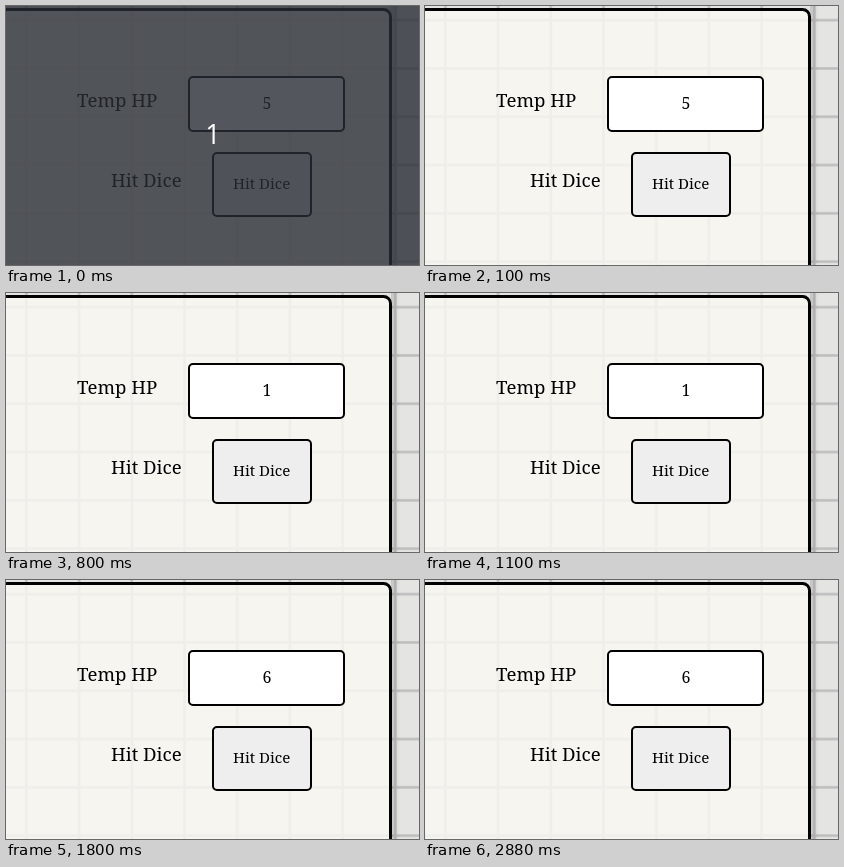
These frames come from a looping animation (413 by 259 pixels, 3600 ms). An HTML page:

```html
<!DOCTYPE html>
<html lang="en">
<head>
<meta charset="utf-8">
<title>Temp HP</title>
<style>
html, body { margin: 0; width: 100%; height: 100%; overflow: hidden; }
svg { display: block; width: 413px; height: 259px; }
text { font-family: "Noto Serif", serif; }
.label { font-size: 18.6px; }
.small { font-size: 15.1px; }
.value { font-size: 16px; text-anchor: middle; }
.count { font: 27px "Open Sans", sans-serif; text-anchor: middle; fill: #fff; }
.box { stroke: #000; stroke-width: 2; }
</style>
</head>
<body>
<svg viewBox="0 0 413 259">
  <defs>
    <pattern id="grid" x="-6" y="-10" width="52.7" height="48.3" patternUnits="userSpaceOnUse">
      <path d="M26.4 0V48.3M0 24.2H52.7" stroke="#bdbdbd" stroke-width="2.6"/>
    </pattern>
    <linearGradient id="shade">
      <stop offset="0" stop-color="#000" stop-opacity=".14"/>
      <stop offset="1" stop-color="#000" stop-opacity="0"/>
    </linearGradient>
  </defs>
  <rect width="413" height="259" fill="#e4e4e3"/>
  <rect width="413" height="259" fill="url(#grid)"/>
  <rect x="385" width="9" height="259" fill="url(#shade)"/>
  <rect x="-20" y="3.5" width="404.5" height="290" rx="7" fill="#f6f5f0"/>
  <rect x="-20" y="3.5" width="404.5" height="290" rx="7" fill="url(#grid)" opacity=".13"/>
  <rect x="-20" y="3.5" width="404.5" height="290" rx="7" fill="none" stroke="#000" stroke-width="3"/>

  <text class="label" x="71" y="101">Temp HP</text>
  <rect class="box" x="183" y="71" width="155" height="54" rx="4" fill="#fff"/>
  <text class="value" id="value" x="261" y="103">5</text>

  <text class="label" x="105" y="181">Hit Dice</text>
  <rect class="box" x="207" y="147" width="98" height="63" rx="4" fill="#eee"/>
  <text class="small" x="227" y="183">Hit Dice</text>

  <g id="overlay">
    <rect width="413" height="259" fill="#282c34" opacity=".8"/>
    <text class="count" x="207" y="138">1</text>
  </g>
</svg>
<script>
const LOOP = 3600;
const COUNTDOWN_END = 100;
const steps = [[0, 5], [800, 1], [1300, 5], [1800, 6]];
const value = document.getElementById("value");
const overlay = document.getElementById("overlay");

function draw(now) {
  const t = now % LOOP;
  const current = steps.filter(([start]) => t >= start).pop();
  value.textContent = current[1];
  overlay.style.display = t < COUNTDOWN_END ? "" : "none";
}

const start = performance.now();
function tick() {
  draw(performance.now() - start);
  requestAnimationFrame(tick);
}
tick();
</script>
</body>
</html>
```
